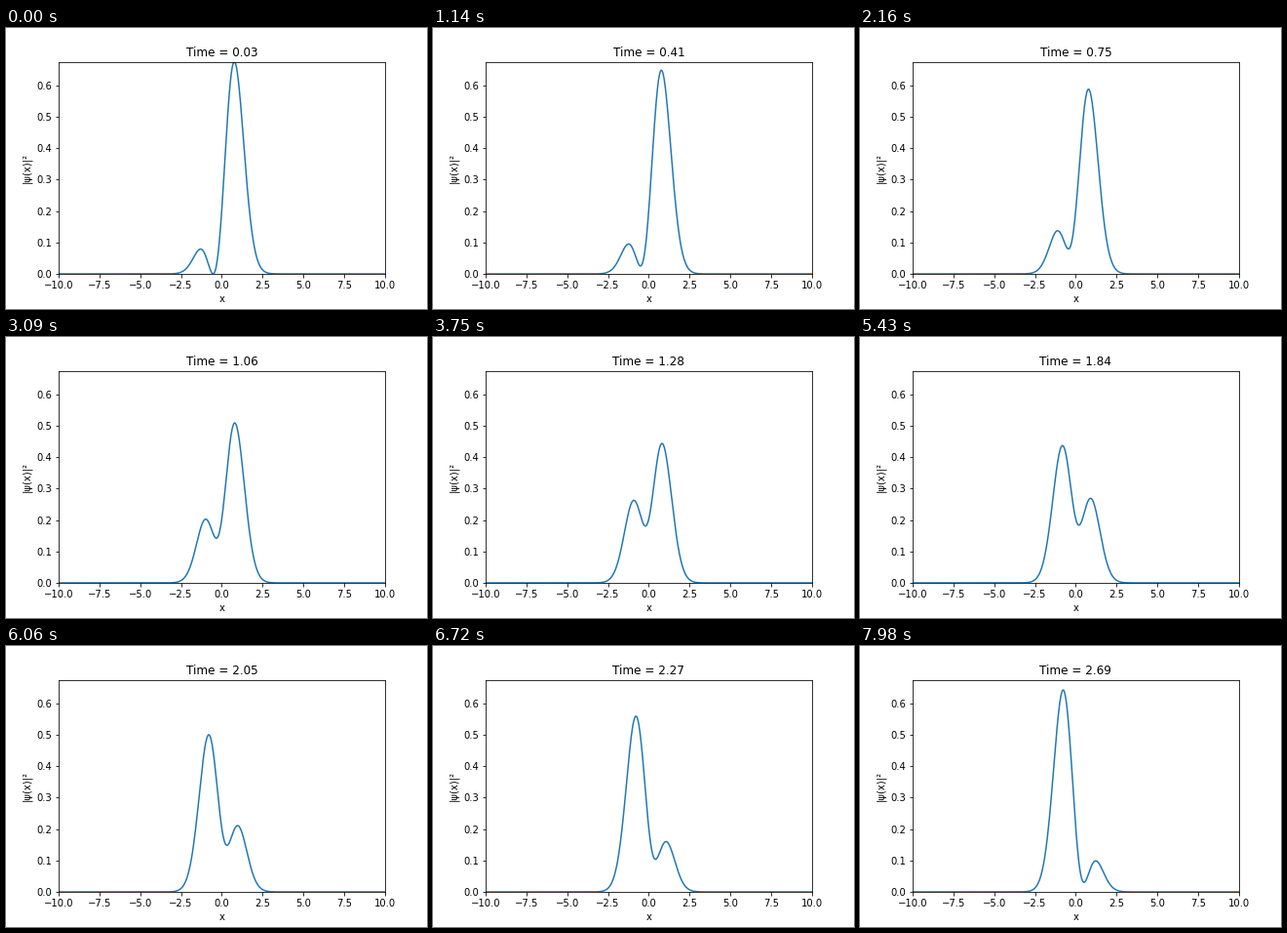
Write a matplotlib script that moves like this. It is 432 by 288 pixels and loops after 8 s.

```python
import numpy as np
import matplotlib.pyplot as plt
from matplotlib.animation import FuncAnimation

LOOP_MS = 8000
FRAMES = 267
DT = 0.01
T_START = 0.03
C0, C1 = 0.6, 0.8  # weights of the ground and first excited state

plt.rcParams.update({"font.family": "DejaVu Sans", "font.size": 10})

x = np.linspace(-10, 10, 1000)
phi0 = np.pi ** -0.25 * np.exp(-x ** 2 / 2)
phi1 = np.sqrt(2) * x * phi0


def density(t):
    """Probability density of the oscillator superposition at time t."""
    psi = C0 * phi0 * np.exp(-0.5j * t) + C1 * phi1 * np.exp(-1.5j * t)
    return np.abs(psi) ** 2


fig, ax = plt.subplots(figsize=(6, 4), dpi=72, facecolor="white")
fig.subplots_adjust(left=0.125, right=0.9, bottom=0.125, top=0.88)
ax.set_xlim(-10, 10)
ax.set_ylim(0, density(0).max())
ax.set_xlabel("x")
ax.set_ylabel("|ψ(x)|²")
line, = ax.plot(x, density(T_START), color="#1f77b4", lw=1.5)
title = ax.set_title(f"Time = {T_START:.2f}", fontsize=12)


def update(i):
    t = T_START + i * DT
    line.set_ydata(density(t))
    title.set_text(f"Time = {t:.2f}")
    return line, title


anim = FuncAnimation(fig, update, frames=FRAMES, interval=LOOP_MS / FRAMES,
                     repeat=True, repeat_delay=0, blit=False)
plt.show()
```
